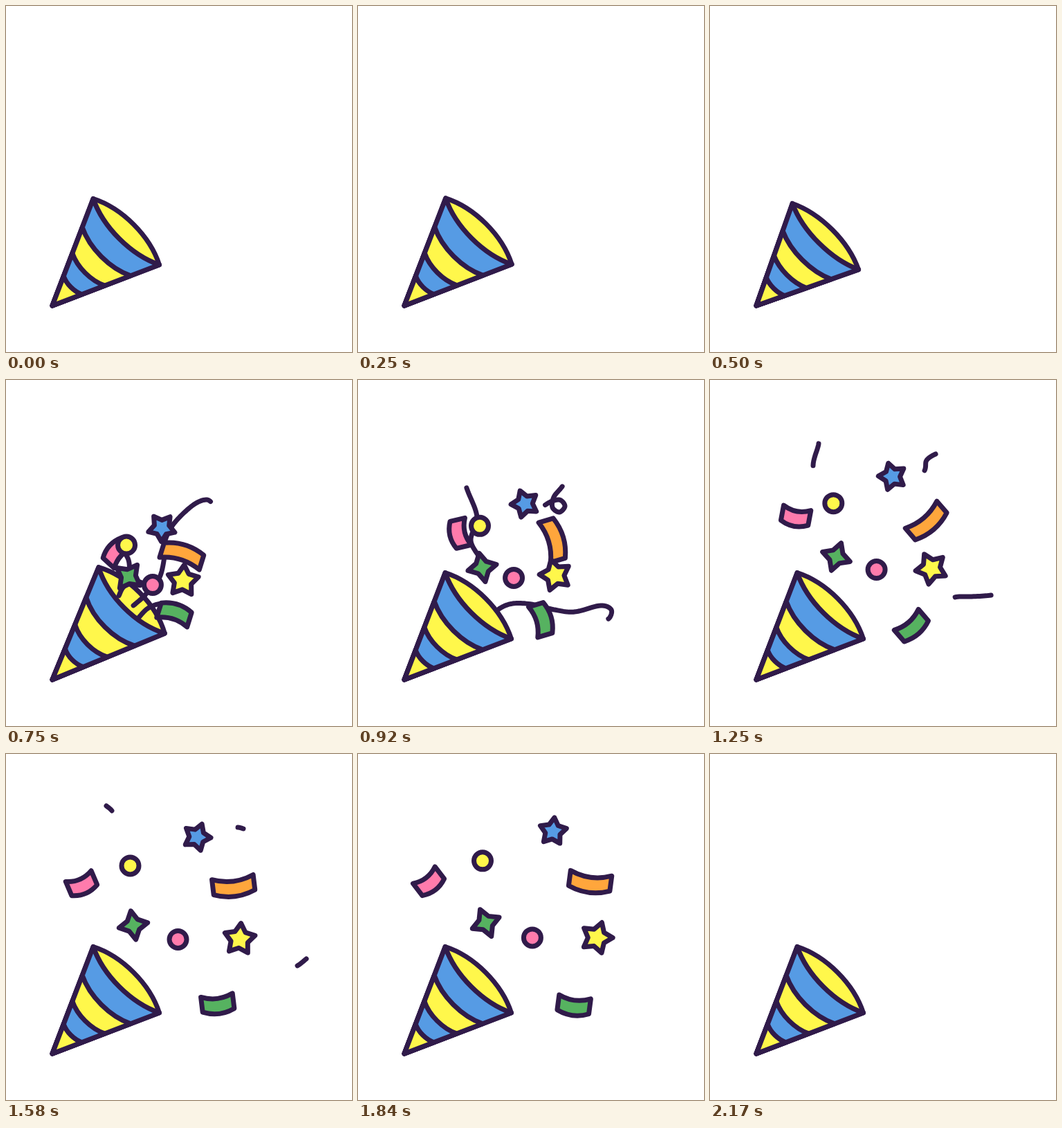
Animation of 500 by 500 pixels, one loop 2.21 s. Source, as an HTML page with a canvas:

```html
<!DOCTYPE html>
<html lang="en">
<head>
<meta charset="utf-8">
<title>Party popper</title>
<style>
html, body { margin: 0; width: 100%; height: 100%; overflow: hidden; background: #fff; }
canvas { display: block; width: 100vmin; height: 100vmin; }
</style>
</head>
<body>
<canvas id="stage" width="500" height="500"></canvas>
<script>
const ctx = document.getElementById('stage').getContext('2d');
const LOOP = 2210;
const INK = '#301b4a', YELLOW = '#fff74b', BLUE = '#569be4',
      PINK = '#ff7bac', ORANGE = '#ffa63c', GREEN = '#56b260';

const clamp = v => Math.max(0, Math.min(1, v));
const smooth = u => u * u * (3 - 2 * u);
const linear = u => u;

// Value at time t of matching lists of times and values
function track(t, times, values, ease) {
  if (t <= times[0]) return values[0];
  for (let i = 1; i < times.length; i++) {
    if (t < times[i]) {
      const u = (t - times[i - 1]) / (times[i] - times[i - 1]);
      return values[i - 1] + (values[i] - values[i - 1]) * ease(u);
    }
  }
  return values[values.length - 1];
}

function paint(color) {
  ctx.fillStyle = color;
  ctx.fill();
  ctx.stroke();
}

// Cone: stretches along its axis only, tip fixed
const CONE_TIMES = [0, 170, 330, 500, 700, 915];
const CONE_STRETCH = [1, 0.93, 1.08, 0.935, 1.085, 1];

function cone(t) {
  const s = track(t, CONE_TIMES, CONE_STRETCH, smooth);
  const slice = (r, bulge, color) => {
    const x = 151 * r * s, c = (151 + bulge) * r * s, y = 67.5 * r;
    ctx.beginPath();
    ctx.moveTo(0, 0);
    ctx.lineTo(x, -y);
    ctx.bezierCurveTo(c, -y * 0.42, c, y * 0.42, x, y);
    ctx.closePath();
    paint(color);
  };
  ctx.save();
  ctx.translate(67, 433);
  ctx.rotate(-Math.PI / 4);
  slice(1, 20, YELLOW);
  [BLUE, YELLOW, BLUE, YELLOW].forEach((color, i) =>
    slice([1, 0.732, 0.49, 0.276][i], -19, color));
  ctx.restore();
}

// Streamers: smooth paths; head and tail are positions counted in points
const STREAM_TIMES = [600, 750, 920, 1250, 1580, 1710];
const streamers = [
  { pts: [178,282, 177,260, 163,232, 172,198, 157,156, 149,124, 157,92, 153,82, 145,75],
    head: [0, 1.7, 4, 6, 8, 8], tail: [0, 0, 1, 5, 7, 8] },
  { pts: [163,312, 171,298, 190,291, 207,298, 222,285, 229,255, 230,232, 243,207,
          270,181, 290,173, 299,182, 291,191, 281,184, 283,169, 295,154,
          310,131, 313,116, 326,107, 335,106, 343,108],
    head: [0, 9.4, 14, 17, 19, 19], tail: [0, 0, 8, 15, 18, 19] },
  { pts: [192,343, 205,330, 224,323, 250,324, 284,332, 313,335, 350,326, 366,332,
          362,345, 349,342, 345,325, 354,314, 378,313, 406,311, 421,306, 434,296],
    head: [0, 2.2, 8, 13, 15, 15], tail: [0, 0, 0.85, 11, 14, 15] },
  { pts: [184,326, 200,312, 208,300],
    head: [0, 2, 2, 2, 2, 2], tail: [0, 0, 2, 2, 2, 2] }
];

// Catmull-Rom point at position u
function along(pts, u) {
  const last = pts.length / 2 - 1;
  const i = Math.min(Math.floor(u), last - 1), f = u - i;
  return [0, 1].map(axis => {
    const [a, b, c, d] = [-1, 0, 1, 2].map(k =>
      pts[2 * Math.max(0, Math.min(last, i + k)) + axis]);
    return b + f / 2 * (c - a + f * (2 * a - 5 * b + 4 * c - d + f * (3 * (b - c) + d - a)));
  });
}

function streamer({ pts, head, tail }, t) {
  const from = track(t, STREAM_TIMES, tail, linear);
  const to = track(t, STREAM_TIMES, head, linear);
  if (to - from < 0.02) return;
  const steps = Math.ceil((to - from) * 10);
  ctx.beginPath();
  for (let i = 0; i <= steps; i++) ctx.lineTo(...along(pts, from + (to - from) * i / steps));
  ctx.stroke();
}

// Confetti shapes, centred on the origin
const dot = () => ctx.arc(0, 0, 12.5, 0, 7);

const star = (tips, outer, inner) => () => {
  for (let i = 0; i < tips * 2; i++) {
    const a = i * Math.PI / tips, r = i % 2 ? inner : outer;
    ctx.lineTo(r * Math.cos(a), r * Math.sin(a));
  }
  ctx.closePath();
};

// Bent strip whose belly points along +x
const ribbon = (half, sag) => () => {
  const x = -sag / 2, h = 11;
  ctx.moveTo(x - h, half);
  ctx.quadraticCurveTo(x - h + sag * 2, 0, x - h, -half);
  ctx.lineTo(x + h, -half);
  ctx.quadraticCurveTo(x + h + sag * 2, 0, x + h, half);
  ctx.closePath();
};

// x, y, angle at 920 ms, their change up to 1580 ms, and how far the path bows
const confetti = [
  { draw: ribbon(20, 5), color: PINK, pose: [146, 222, 167], move: [-36, -33, -100], bow: [-7, 9, 0] },
  { draw: ribbon(30, 6), color: ORANGE, pose: [283, 231, -17], move: [46, -39, 100], bow: [-3, -1, 0] },
  { draw: ribbon(23, 5), color: GREEN, pose: [266, 346, -17], move: [40, 16, 100] },
  { draw: dot, color: YELLOW, pose: [176, 211, 0], move: [3.5, -49.5, 0] },
  { draw: dot, color: PINK, pose: [225, 286, 0], move: [23.5, -18, 0] },
  { draw: star(4, 21, 10.5), color: GREEN, pose: [179.5, 271, -12], move: [4.5, -23.5, -88] },
  { draw: star(5, 20, 11.2), color: BLUE, pose: [241, 179, 34], move: [35, -59, -103], bow: [4, 2, 0] },
  { draw: star(5, 23, 12.8), color: YELLOW, pose: [285, 282, 38], move: [52.5, -14.5, 93] }
];

const decay = t => 1 - Math.exp((920 - t) / 490);

function piece({ draw, color, pose, move, bow = [0, 0, 0] }, t) {
  const q = decay(t) / decay(1580);
  const [x, y, angle] = pose.map((v, i) => v + move[i] * q + bow[i] * q * (q - 1));
  const out = 1 - (1 - clamp((t - 590) / 150)) ** 2;
  const size = out * (1 - clamp((t - 2020) / 145) ** 2);
  if (size < 0.01) return;
  ctx.save();
  ctx.translate(175 + (x - 175) * out, 325 + (y - 325) * out);
  ctx.rotate(angle * Math.PI / 180);
  ctx.scale(size, size);
  ctx.beginPath();
  draw();
  paint(color);
  ctx.restore();
}

function frame() {
  const t = performance.now() % LOOP;
  ctx.fillStyle = '#fff';
  ctx.fillRect(0, 0, 500, 500);
  ctx.strokeStyle = INK;
  ctx.lineWidth = 7;
  ctx.lineJoin = ctx.lineCap = 'round';
  cone(t);
  streamers.forEach(s => streamer(s, t));
  confetti.forEach(p => piece(p, t));
  requestAnimationFrame(frame);
}
frame();
</script>
</body>
</html>
```
